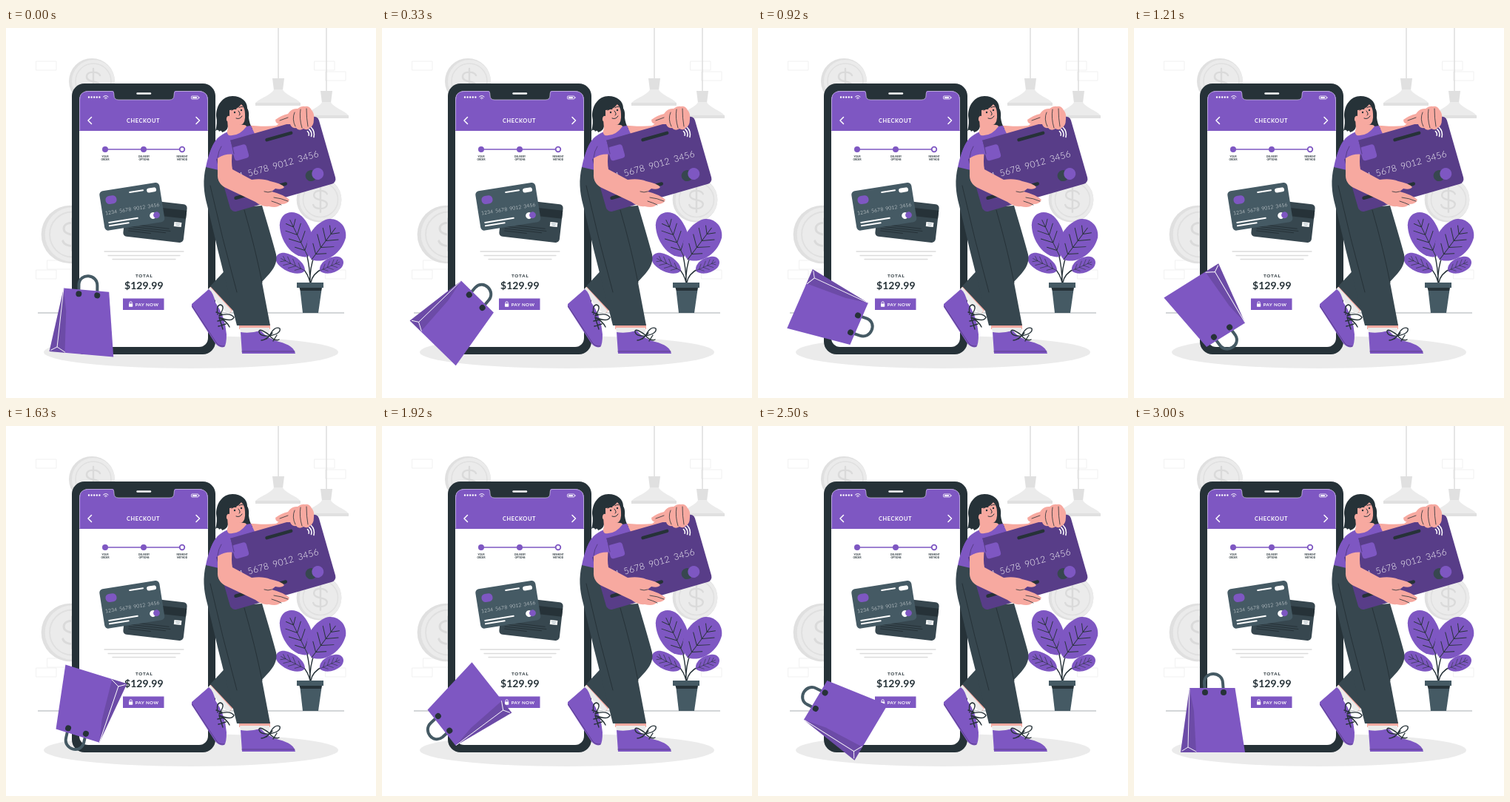
Recreate the animation shown at these times as an HTML page. Size 500 px wide and 500 px high, loop 3040 ms.

```html
<!DOCTYPE html>
<html lang="en">
<head>
<meta charset="utf-8">
<title>Checkout</title>
<style>
html, body { margin: 0; height: 100%; overflow: hidden; background: #fff }
svg { display: block; width: 100vw; height: 100vh }
text { font-family: Lato, sans-serif; font-weight: 700; text-anchor: middle }
.line { fill: none; stroke-linecap: round; stroke-linejoin: round }
.ink { stroke: #263238 }
.purple { fill: #7e57c2 }
.dark { fill: #263238 }
.slate { fill: #37474f }
.steel { fill: #455a64 }
.skin { fill: #f7a9a0 }
.pale { fill: #ebebeb }
.grey { fill: #e0e0e0 }
</style>
</head>
<body>
<svg viewBox="0 0 500 500">
<defs>
  <g id="coin">
    <circle class="grey" r="31"/>
    <circle class="pale" cx="2" r="29"/>
    <circle cx="2" r="24" fill="none" stroke="#e0e0e0" stroke-width="1.5"/>
    <path class="line" d="M11-8C8-14-6-14-7-7C-8 3 12-2 11 7C10 14-6 14-8 7M2-17V17" stroke="#dadada" stroke-width="2.4"/>
  </g>
  <g id="lamp">
    <path d="M0-90V0" stroke="#d8d8d8" stroke-width="1.3"/>
    <path class="grey" d="M-8 0H8L6 16H-6Z"/>
    <path class="pale" d="M-6 15H6C8 22 28 28 30 34H-31C-28 28-8 22-6 15Z"/>
    <path class="grey" d="M-31 33H30V37H-31Z"/>
  </g>
  <g id="leaf">
    <path class="purple" d="M0 0C5-25 33-32 52-20C66-10 64 12 50 21C32 30 6 22 0 0Z"/>
    <path class="line ink" d="M0 0H52M9 0L18-13M9 0L18 12M20 0L31-16M20 0L31 15M31 0L42-15M31 0L42 14M42 0L50-9M42 0L50 9" stroke-width="1"/>
  </g>
  <clipPath id="screen"><rect x="99" y="85" width="174" height="346" rx="12"/></clipPath>
</defs>

<!-- room -->
<path class="line" d="M41 45h27v12H41ZM417 45h27v12h-27ZM432 59h27v12h-27ZM41 327h27v12H41ZM56 314h34v12H56ZM432 327h27v12h-27Z" stroke="#f1f1f1"/>
<use href="#coin" x="116" y="72"/>
<use href="#coin" transform="translate(87 279) scale(1.27)"/>
<use href="#coin" transform="translate(423 232) scale(.98)"/>
<use href="#lamp" x="368" y="68"/>
<use href="#lamp" x="433" y="85"/>
<path d="M43 385H457" stroke="#6d777c" stroke-width=".6"/>
<ellipse class="pale" cx="250" cy="438" rx="199" ry="22"/>

<!-- plant -->
<path class="line ink" d="M411 344Q411 325 406 304M411 344Q410 325 417 307M411 344Q408 332 401 325M412 344Q414 332 428 325" stroke-width="1.4"/>
<use href="#leaf" transform="translate(408 309) rotate(-116) scale(1.06 .78)"/>
<use href="#leaf" transform="translate(413 313) rotate(-53) scale(1.03 .9)"/>
<use href="#leaf" transform="translate(404 328) rotate(207) scale(.7 .44)"/>
<use href="#leaf" transform="translate(424 328) rotate(-24) scale(.56 .4)"/>
<path class="steel" d="M397 350H427L422 385H401Z"/>
<path class="dark" d="M396 350H427L426 355H398Z"/>
<path class="steel" d="M393 344H429V351H393Z"/>

<!-- phone -->
<rect class="dark" x="89" y="75" width="194" height="366" rx="17"/>
<g clip-path="url(#screen)">
  <path fill="#fff" d="M99 85H273V431H99Z"/>
  <path class="purple" d="M99 85H273V139H99Z"/>
  <path class="dark" d="M144 84H229Q227 85 227 89V91Q227 97 221 97H152Q146 97 146 91V89Q146 85 144 84Z"/>
  <path class="line" d="M99.5 138V97Q99.5 85.5 111 85.5H143Q146 85.5 146 91Q146 97 152 97H221Q227 97 227 91Q227 85.5 230 85.5H261Q272.5 85.5 272.5 97V138" stroke="#e5def2" stroke-width=".6"/>
</g>
<path class="line" d="M177.5 88.5H195" stroke="#fff" stroke-width="2.4"/>
<path class="line" d="M112 93.5H127" stroke="#fff" stroke-width="2.4" stroke-dasharray="0 3.6"/>
<path class="line" d="M131.5 93Q134.8 90 138 93M133.2 94.7Q134.8 93.4 136.4 94.7M134.8 96V96" stroke="#fff" stroke-width="1"/>
<rect x="250.5" y="92" width="9.5" height="4" rx="1" fill="none" stroke="#fff" stroke-width=".8"/>
<path d="M252 93.2H258V95H252ZM260.5 93.2H261.5V95H260.5Z" fill="#fff"/>
<path class="line" d="M115.5 120.5L111 125L115.5 129.5M257 120.5L261.5 125L257 129.5" stroke="#fff" stroke-width="1.5"/>
<text x="185.500" y="127.800" font-size="7.400" letter-spacing=".6" fill="#fff">CHECKOUT</text>

<path d="M134 164H234" stroke="#7e57c2" stroke-width="1.3"/>
<circle class="purple" cx="134" cy="164" r="4"/>
<circle class="purple" cx="186" cy="164" r="4"/>
<circle cx="238" cy="164" r="3.3" fill="#fff" stroke="#7e57c2" stroke-width="1.8"/>
<g class="dark" font-size="3.200">
  <text x="134" y="175.300">YOUR</text><text x="134" y="179.200">ORDER</text>
  <text x="186.500" y="175.300">DELIVERY</text><text x="186.500" y="179.200">OPTIONS</text>
  <text x="238" y="175.300">PAYMENT</text><text x="238" y="179.200">METHOD</text>
</g>

<g transform="translate(201.500 260) rotate(6.500)">
  <rect class="slate" x="-41" y="-26" width="82" height="52" rx="5"/>
  <path class="dark" d="M-41-18H41V-7H-41Z"/>
  <path fill="#fff" d="M26-1H36V5H26Z"/>
  <path class="line" d="M28 1H34M29 3H33" stroke="#90a4ae" stroke-width=".7"/>
  <path class="line ink" d="M-34 9H20M-34 12H22M-34 15H16M-34 18H-4" stroke-width="1"/>
</g>
<g transform="translate(170.300 241.300) rotate(-9)">
  <rect class="steel" x="-41" y="-27" width="82" height="54" rx="5"/>
  <rect class="purple" x="-34" y="-19" width="15" height="11" rx="5"/>
  <path class="line" d="M0-19.5H18" stroke="#fff" stroke-width="2"/>
  <rect x="23" y="-21" width="13" height="6" rx="3" fill="#fff"/>
  <text y="5.500" font-size="6.700" style="font-weight:300" letter-spacing=".2" fill="#fff" word-spacing="1">1234 5678 9012 3456</text>
  <path class="line" d="M-34 16.5H5M-34 21H-8" stroke="#fff" stroke-width="2"/>
  <circle cx="26" cy="16.5" r="4.4" fill="#fff"/>
  <circle class="purple" cx="31" cy="16.5" r="4.4"/>
</g>
<path class="line" d="M133 302H240M138 307.500H235M144 312.500H229" stroke="#dcdcdc" stroke-width="1.3"/>
<text class="dark" x="186.700" y="337.300" font-size="6.300" letter-spacing=".8">TOTAL</text>
<text class="dark" x="186.300" y="353" font-size="14" letter-spacing=".1">$129.99</text>
<path class="purple" d="M158 365.500H213.500V381H158Z"/>
<rect x="166" y="372.500" width="5.2" height="4.2" rx=".6" fill="#fff"/>
<path class="line" d="M167 372.500V371.300A1.600 1.600 0 0 1 170.200 371.300V372.500" stroke="#fff" stroke-width=".9"/>
<text x="190.500" y="375.600" font-size="6.200" letter-spacing=".4" fill="#fff">PAY NOW</text>

<!-- back leg -->
<path class="skin" d="M275 351L283 344L309 378L303 385Z"/>
<path class="pale" d="M271 355L276 350L305 382L300 387Z"/>
<path class="purple" d="M251 373L274 353Q280 357 283 371Q296 389 298 414Q298 428 295 431Q288 433 282 425L251 377Z"/>
<path class="line" d="M251.500 376L284 425Q288 431 295 430" stroke="#5b3f8c" stroke-width="1"/>
<path class="line ink" d="M286 387Q284 374 290 374Q297 376 288 389Q303 384 308 391Q305 398 288 391M288 391Q298 396 302 404M288 391L293 407M284 384L292 387M286 396L295 394M287 403L297 400" stroke-width="1.4"/>
<path class="slate" d="M305 243L346 240Q358 280 365 306C368 322 356 332 343 346L307 382L276 349L303 320Z"/>

<!-- front leg -->
<path class="skin" d="M315 400H357V407H315Z"/>
<path class="pale" d="M316 405H356V412H317Z"/>
<path class="purple" d="M317 411Q330 413 344 409Q354 420 369 424Q389 429 391 440H319Z"/>
<path class="line" d="M319 437H390" stroke="#5b3f8c" stroke-width="1"/>
<path class="line ink" d="M356 415Q341 404 342 411Q344 417 356 416Q363 402 370 406Q372 413 356 416M356 416Q350 422 345 422M356 416Q364 424 369 421M352 420L360 412M361 423L366 415" stroke-width="1.4"/>
<path class="slate" d="M270 188L315 182L323 246Q338 303 346 344L357 402H312L287 303L272 240Q264 212 270 188Z"/>
<path class="line ink" d="M322 246Q337 298 346 344M276 213Q292 284 312 357" stroke-width="1"/>

<!-- far arm, head, body -->
<path class="skin" d="M322 131Q350 134 365 132L385 118L392 132Q365 148 325 149Z"/>
<path class="dark" d="M317 103C327 104 329 113 328 121Q329 130 333 136Q322 138 316 131Z"/>
<path class="dark" d="M283 139Q286 128 284 119C284 104 293 92 306 92C318 92 326 99 326 108L318 122L305 136Q303 132 300 133Q299 139 292 141Q291 137 288 140Q287 136 283 139Z"/>
<path class="purple" d="M270 188Q276 158 288 147Q302 136 331 132L337 145L304 156L309 197Z"/>
<path class="skin" d="M299 123L318 126L316 131Q324 130 325 133Q315 147 301 145Q297 142 300 136Z"/>
<path class="skin" d="M302 111Q312 111 318 103Q323 108 323 116Q324 128 318 131Q310 131 304 126Q297 128 298 122Q299 118 302 119Z"/>
<path class="line ink" d="M305 111Q308 108 311 109.500M315 107.500Q318 105.500 320 106.500M314 112Q318 117 315 118M311 122Q316 124 319 119" stroke-width="1"/>
<circle class="dark" cx="309" cy="114" r="1.2"/>
<circle class="dark" cx="318" cy="111" r="1.2"/>

<!-- large card -->
<g transform="translate(421 118) rotate(-16)">
  <rect x="-148" width="148" height="94.5" rx="7" fill="#583d88"/>
  <path class="line ink" d="M-75 13H-41M-137 77H-67" stroke-width="4.500" stroke-linecap="butt"/>
  <rect class="purple" x="-124" y="10" width="20" height="19" rx="4"/>
  <text x="-13" y="54" font-size="12.200" style="font-weight:300;text-anchor:end" fill="#fff" letter-spacing=".2" word-spacing="2.500">1234 5678 9012 3456</text>
  <path class="line" d="M-19 17Q-17 20-19 23M-16 15Q-13 20-16 25M-13 13Q-9 20-13 27" stroke="#fff" stroke-width="1.5"/>
  <circle class="slate" cx="-31" cy="76" r="7.5"/>
  <circle class="purple" cx="-21.500" cy="76" r="8"/>
</g>

<!-- hands and near arm -->
<path class="skin" d="M364 124Q372 118 381 116Q386 108 394 109Q399 105 404 106Q410 105 413 111Q417 115 416 123Q416 133 410 135Q408 139 402 136Q396 140 392 135Q386 136 384 130L372 130Q364 130 364 124Z"/>
<path class="line ink" d="M390 114Q386 123 391 133M398 110Q396 122 400 135M406 109Q406 122 408 133M370 125L381 121" stroke-width=".8"/>
<path class="skin" d="M286 171L306 166Q304 181 306 191L332 205Q347 203 357 207Q372 210 376 215Q373 219 364 217L359 221Q375 225 383 232Q381 238 372 238Q367 244 355 241Q346 242 337 235L297 216Q285 210 286 197Z"/>
<path class="line ink" d="M359 221Q354 223 349 221M362 229Q372 230 381 234M359 234Q366 236 372 239" stroke-width=".8"/>
<path class="purple" d="M287 148Q297 146 303 151L309 171Q297 169 286 176L272 188Q275 159 287 148Z"/>
<path class="line" d="M286 175Q287 166 291 160M304 152L308 170" stroke="#583d88" stroke-width="1"/>

<!-- bag, upright pose -->
<g id="bag">
  <path class="line" d="M96 360L95 347C95 331 119 331 120 347L121 360" stroke="#455a64" stroke-width="4"/>
  <path class="purple" d="M75 354H136.500L150 441H63Z"/>
  <path d="M75 354L63 441H84L81 385Z" opacity=".14"/>
  <path class="line" d="M75 355L73 434M65 439L73 434L84 440" stroke="#fff" stroke-width=".9"/>
  <circle class="dark" cx="96" cy="360" r="4"/>
  <circle class="dark" cx="121" cy="360" r="4"/>
</g>
</svg>
<script>
const LOOP = 3040, STEPS = 73, FPS = 24;
const bag = document.getElementById('bag');

// One full turn per loop, held in steps of 1/24 s.
function draw(now) {
  const step = Math.min(STEPS - 1, Math.floor((now % LOOP + 4) * FPS / 1000));
  bag.setAttribute('transform', `rotate(${(step + 1) * 360 / STEPS} 106.2 387)`);
}

let start;
function tick(now) {
  start ??= now;
  draw(now - start);
  requestAnimationFrame(tick);
}
draw(0);
requestAnimationFrame(tick);
</script>
</body>
</html>
```
